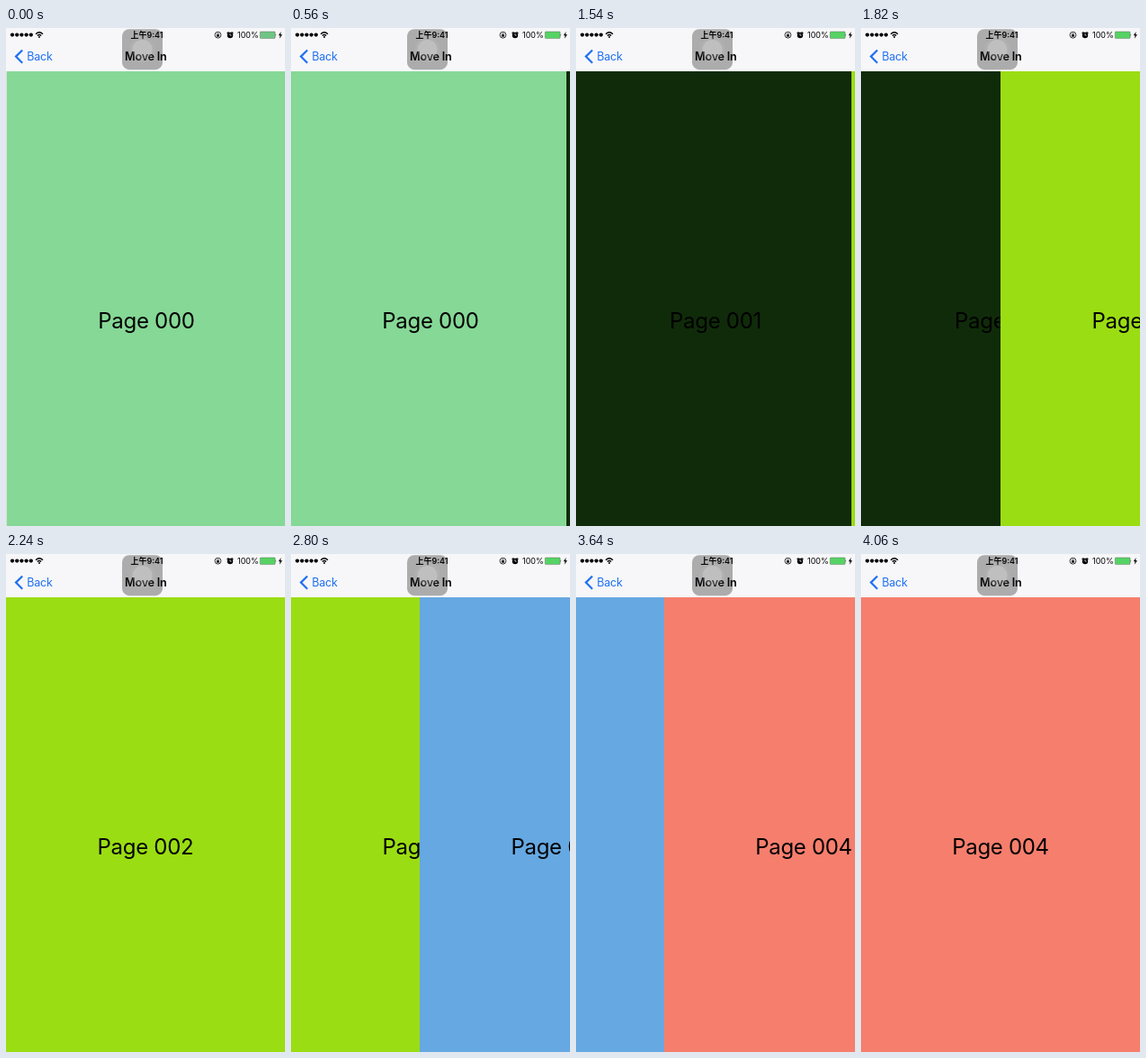
Write an HTML page that moves like this. It is 310x552 px and loops after 4200 ms.

```html
<!DOCTYPE html>
<html lang="en">
<head>
<meta charset="utf-8">
<title>Move In</title>
<style>
  html, body { margin: 0; width: 100%; height: 100%; overflow: hidden; background: #ddd; }
  svg { display: block; width: 100vw; height: 100vh; font-family: Inter, "Noto Sans CJK SC", "Noto Sans CJK", sans-serif; }
  .page text { font-size: 24px; letter-spacing: -.3px; text-anchor: middle; }
  .bar { letter-spacing: -.2px; }
  .accent { color: #1f70f2; }
  .line { fill: none; stroke: #000; }
</style>
</head>
<body>
<svg viewBox="0 0 310 552">
  <rect width="310" height="552" fill="#ddd"/>
  <g id="pages"></g>

  <rect width="310" height="48" fill="#f7f7f9"/>

  <!-- Status bar -->
  <g id="signal"></g>
  <path class="line" d="M33 6.7Q37 2.9 41 6.7M34.8 8.5Q37 6.5 39.2 8.5" stroke-width="1.3"/>
  <circle cx="37" cy="10" r="1"/>
  <text x="156.5" y="11" font-size="9" font-weight="600" text-anchor="middle">上午9:41</text>
  <circle class="line" cx="235.5" cy="7.7" r="3.4" stroke-width=".8"/>
  <path d="M234 7.3h3v2.3h-3z"/>
  <path class="line" d="M234.6 7.4v-1q.9-1.3 1.8 0v1" stroke-width=".6"/>
  <circle cx="249" cy="8" r="3.2"/>
  <path class="line" d="M245.6 6l1.8-1.6M252.4 6l-1.8-1.6" stroke-width="1.1"/>
  <path d="M249 6v2.2h1.7" fill="none" stroke="#f7f7f9" stroke-width=".7"/>
  <text x="257" y="11" font-size="9">100%</text>
  <rect id="battery" x="282.3" y="4" width="16.8" height="7.6" rx=".8" stroke="#555" stroke-width=".4"/>
  <path d="M299.5 6.5q1.5 1.3 0 2.6z" fill="#444"/>
  <path d="M305.6 4l-2.8 4.2h1.8l-.8 3.5 3.2-4.5h-1.9z"/>

  <!-- Navigation bar -->
  <g id="back" class="accent bar">
    <path d="M18.2 24.5l-7.2 7.1 7.2 7.1" fill="none" stroke="currentColor" stroke-width="2.2"/>
    <text x="23.2" y="36" font-size="12.5" fill="currentColor">Back</text>
  </g>
  <text class="bar" x="155.3" y="36" font-size="12.6" font-weight="600" text-anchor="middle">Move In</text>

  <!-- Floating touch button -->
  <rect x="129" y="1.2" width="45" height="45" rx="8" fill="#141414" fill-opacity=".33"/>
  <g fill="#fff">
    <circle cx="151.5" cy="24" r="14" fill-opacity=".06"/>
    <circle cx="151.5" cy="24" r="11" fill-opacity=".2"/>
  </g>
</svg>
<script>
const WIDTH = 310, LOOP = 4200, STEP = 140, STEEPNESS = 2.2;
// mid: the moment when the page's left edge crosses the middle of the screen
const pages = [
  { color: '#86d896', mid: -365 },
  { color: '#102b0a', mid: 830 },
  { color: '#9bdd13', mid: 1820 },
  { color: '#66a8e2', mid: 2790 },
  { color: '#f67e6d', mid: 3591 }
];
const byId = id => document.getElementById(id);

function add(parent, tag, attributes, text = '') {
  const node = document.createElementNS('http://www.w3.org/2000/svg', tag);
  for (const [name, value] of Object.entries(attributes)) node.setAttribute(name, value);
  node.textContent = text;
  return parent.appendChild(node);
}

pages.forEach((page, i) => {
  page.node = add(byId('pages'), 'g', { class: 'page' });
  add(page.node, 'rect', { y: 48, width: WIDTH, height: 504, fill: page.color });
  add(page.node, 'text', { x: 155, y: 333 }, `Page 00${i}`);
});
for (let i = 0; i < 5; i++) add(byId('signal'), 'circle', { cx: 7 + i * 5.2, cy: 7.6, r: 2.15 });

// Drag in slowly, then settle: a logistic curve from WIDTH to 0
const offset = (time, mid) =>
  Math.round(WIDTH / (1 + Math.exp(STEEPNESS * (time - mid) / STEP)));

function draw(time) {
  for (const { node, mid } of pages) {
    node.setAttribute('transform', `translate(${offset(time, mid)} 0)`);
  }
  const blue = time >= 3220 && time < 3500;
  byId('battery').setAttribute('fill', blue ? '#5ca6e0' : time < 560 ? '#70c583' : '#56d364');
  byId('back').style.color = blue ? '#5aa2e2' : '';
}

const start = performance.now();
function tick() {
  const time = (performance.now() - start) % LOOP;
  draw(Math.floor(time / STEP) * STEP);
  requestAnimationFrame(tick);
}
tick();
</script>
</body>
</html>
```
